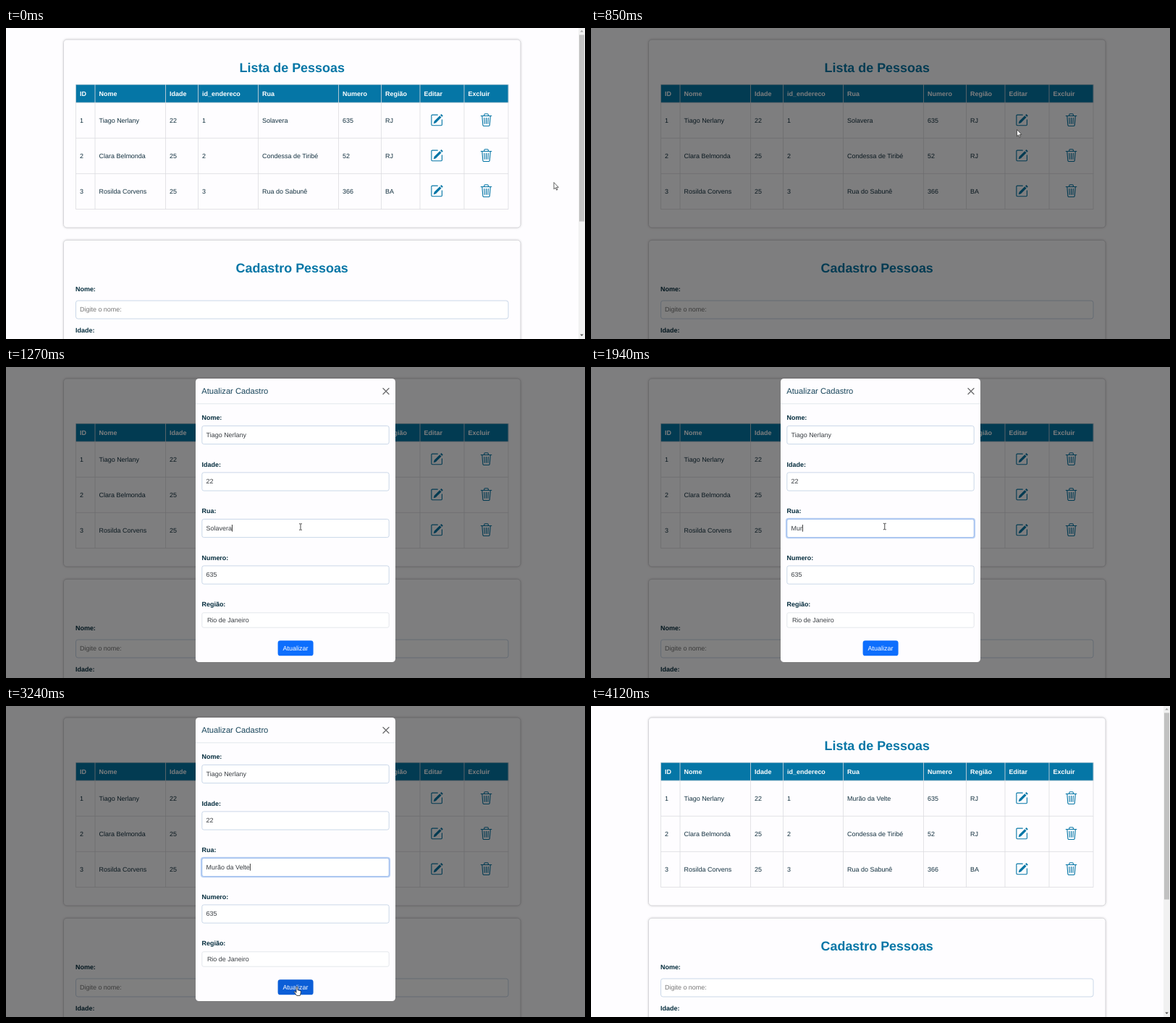
Write an HTML page that moves like this. It is 800 px wide and 430 px high and loops after 4820 ms.

```html
<!DOCTYPE html>
<html lang="pt-BR">
<head>
<meta charset="utf-8">
<title>Lista de Pessoas</title>
<style>
  html, body { margin: 0; width: 100%; height: 100%; overflow: hidden; background: #fefdff; }
  svg { display: block; width: 800px; height: 430px; }
  text { font: 8.96px "Liberation Sans", Arial, sans-serif; fill: #12303f; text-rendering: geometricPrecision; white-space: pre; }
  .bold { font-weight: bold; fill: #032b3c; }
  .head { font-weight: bold; fill: #fff; }
  .title { font-size: 17.92px; font-weight: bold; fill: #0576a6; text-anchor: middle; }
  .hint { fill: #757575; }
  .value { fill: #383d42; }
  .modal-title { font-size: 11.2px; fill: #17445a; }
  .action { fill: #fff; text-anchor: middle; }
  .card { fill: #fefdff; stroke: #d6d6da; filter: drop-shadow(0 0 1.6px rgba(0, 0, 0, .16)); }
  .field { fill: #fff; stroke: #bdcfe2; stroke-width: .8; }
  .select { fill: #fff; stroke: #dee2e6; stroke-width: .8; }
  .grid { fill: none; stroke: #dcdce0; stroke-width: .8; }
  .icon { fill: none; stroke: #0576a6; stroke-width: 1; stroke-linecap: round; stroke-linejoin: round; }
  .icon .solid { fill: #0576a6; stroke: none; }
</style>
</head>
<body>
<svg id="stage" viewBox="0 0 800 430">
  <defs>
    <g id="pencil" class="icon">
      <path d="M9 1.5H2.5a1 1 0 0 0-1 1v11a1 1 0 0 0 1 1h11a1 1 0 0 0 1-1v-6"/>
      <path class="solid" d="M4 12.2l.9-3 6.8-6.8 2 2-6.8 6.9zM12.4 1.7l1.3-1.2 2 2-1.2 1.2z"/>
    </g>
    <g id="trash" class="icon">
      <path d="M1.5 3h13M5.5 2.7V1.5a1 1 0 0 1 1-1h3a1 1 0 0 1 1 1v1.2"/>
      <path d="M2.9 3l.9 11a1.5 1.5 0 0 0 1.5 1.5h5.4a1.5 1.5 0 0 0 1.5-1.5l.9-11M5.6 5.5l.3 7M8 5.5v7M10.4 5.5l-.3 7"/>
    </g>
  </defs>
  <rect width="800" height="430" fill="#fefdff"/>
  <g id="page"></g>
  <g id="scrollbar">
    <rect x="791" width="9" height="430" fill="#f1f1f1"/>
    <rect x="792" y="9.5" width="7" height="258" fill="#c1c1c1"/>
    <path d="M793.2 5.5l2.3-2.4 2.3 2.4z" fill="#a3a3a3"/>
    <path d="M793.2 423.5l2.3 2.4 2.3-2.4z" fill="#505050"/>
  </g>
  <rect id="backdrop" width="800" height="430"/>
  <g id="modal"></g>
  <g id="cursor">
    <path id="arrow" d="M0 0v9.3l2.1-2 1.5 3.3 1.4-.6-1.5-3.2h2.9z" fill="#fff" stroke="#222" stroke-width=".7"/>
    <path id="hand" d="M-1 1a1 1 0 0 1 2 0v3.7l3.2.7q1.4.4 1.2 2l-.5 2.8-.7 2.3h-4.5l-2-3-1.5-2q.3-1.4 1.4-.6l1.4 1.4z" fill="#fff" stroke="#222" stroke-width=".8" stroke-linejoin="round"/>
    <path id="beam" d="M-2-4.2h1.4l.6.5.6-.5h1.4M0-3.7v7.4M-2 4.2h1.4l.6-.5.6.5h1.4" fill="none" stroke="#333" stroke-width=".9"/>
  </g>
</svg>
<script>
const LOOP = 4820;
const OLD_STREET = "Solavera", NEW_STREET = "Murão da Velte";
const $ = id => document.getElementById(id);

function add(parent, tag, attrs, content = "") {
  const node = document.createElementNS("http://www.w3.org/2000/svg", tag);
  for (const key in attrs) node.setAttribute(key, attrs[key]);
  node.textContent = content;
  return parent.appendChild(node);
}
const write = (parent, x, y, content, cls = "") => add(parent, "text", { x, y, class: cls }, content);
const box = (parent, x, y, width, height, rx, cls) => add(parent, "rect", { x, y, width, height, rx, class: cls });

function buildPage() {
  const page = $("page");
  const columns = [96.5, 123, 220.5, 265.5, 348.5, 459.5, 518.5, 572, 633, 694];
  const heads = ["ID", "Nome", "Idade", "id_endereco", "Rua", "Numero", "Região", "Editar", "Excluir"];
  const rows = [
    ["1", "Tiago Nerlany", "22", "1", OLD_STREET, "635", "RJ"],
    ["2", "Clara Belmonda", "25", "2", "Condessa de Tiribé", "52", "RJ"],
    ["3", "Rosilda Corvens", "25", "3", "Rua do Sabunê", "366", "BA"]
  ];
  let street;

  box(page, 79.5, 16, 631.5, 260, 4.5, "card");
  box(page, 79.5, 293.3, 631.5, 260, 4.5, "card");
  write(page, 395.2, 61.2, "Lista de Pessoas", "title");
  write(page, 395.2, 338.2, "Cadastro Pessoas", "title");

  add(page, "rect", { x: 96, y: 78, width: 598.2, height: 25.2, fill: "#0576a6" });
  let lines = columns.map(x => `M${x} 78V250.6`).join("");
  for (let i = 0; i < 4; i++) lines += `M96.5 ${103.2 + i * 49.1}H694`;
  add(page, "path", { d: lines + "M96.5 78.2H694", class: "grid" });

  heads.forEach((head, i) => write(page, columns[i] + 5.6, 93.6, head, "head"));
  rows.forEach((row, r) => {
    const top = r * 49;
    row.forEach((cell, i) => {
      const node = write(page, columns[i] + 5.6, 130.8 + top, cell);
      if (cell === OLD_STREET) street = node;
    });
    add(page, "use", { href: "#pencil", transform: `translate(586.2 ${118.5 + top}) scale(1.12)` });
    add(page, "use", { href: "#trash", transform: `translate(654.6 ${118.2 + top}) scale(1.12)` });
  });

  write(page, 96, 363.8, "Nome:", "bold");
  box(page, 96.5, 377, 597.5, 25, 3, "field");
  write(page, 102, 392.2, "Digite o nome:", "hint");
  write(page, 96, 420.6, "Idade:", "bold");
  return { street };
}

function buildModal() {
  const modal = $("modal");
  const values = [["Nome:", "Tiago Nerlany"], ["Idade:", "22"], ["Rua:", OLD_STREET], ["Numero:", "635"]];
  const parts = {};

  box(modal, 262, 16, 276, 392, 4.5, "").setAttribute("fill", "#fefdff");
  write(modal, 270.3, 37.4, "Atualizar Cadastro", "modal-title");
  add(modal, "path", { d: "M521 29.5l8 8m0-8l-8 8", stroke: "#6c6c6e", "stroke-width": 1.3, "stroke-linecap": "round" });
  add(modal, "path", { d: "M262 50.8H538", stroke: "#dee2e6", "stroke-width": .8 });

  values.forEach(([label, value], i) => {
    const top = i * 64.5;
    write(modal, 270.5, 73.4 + top, label, "bold");
    if (label === "Rua:")
      parts.ring = add(modal, "rect", { x: 270, y: 80.8 + top, width: 260, height: 26.4, rx: 3, fill: "none", stroke: "#b9d0f4", "stroke-width": 2.2 });
    const field = box(modal, 270.8, 81.4 + top, 258.4, 25.2, 2.6, "field");
    const text = write(modal, 276.6, 96.8 + top, value, "value");
    if (label === "Rua:") Object.assign(parts, { field, text });
  });
  write(modal, 270.5, 331.4, "Região:", "bold");
  box(modal, 270.8, 339.8, 258.4, 20.4, 2.2, "select");
  write(modal, 277.9, 352.9, "Rio de Janeiro", "value");
  parts.button = box(modal, 375.6, 378.3, 49, 21, 3.4, "");
  write(modal, 400, 391.6, "Atualizar", "action");
  parts.caret = add(modal, "rect", { y: 218, width: .8, height: 9.6, fill: "#111" });
  return parts;
}

const { street } = buildPage();
const { ring, field, text, button, caret } = buildModal();

const ramp = (t, from, to) => Math.min(1, Math.max(0, (t - from) / (to - from)));
const smooth = p => p * p * (3 - 2 * p);

// time, x, y, shape until the next stop
const path = [
  [0, 757, 213.5, "arrow"], [50, 757, 213.5, "arrow"], [590, 592, 146, "hand"],
  [690, 588.5, 140.5, "hand"], [820, 588.5, 140.5, "arrow"], [940, 588.5, 140.5, "arrow"],
  [1160, 412, 223, "beam"], [1260, 407, 221, "beam"], [2660, 404.5, 220, "beam"],
  [2800, 404.5, 220, "beam"], [2890, 403, 245, "arrow"], [3150, 402, 388, "hand"],
  [3310, 402, 388, "arrow"], [3410, 414.5, 396, "beam"], [3640, 414.5, 396, "beam"],
  [3760, 415, 404, "arrow"], [4040, 418, 440, "arrow"]
];

function moveCursor(t) {
  const i = path.findLastIndex(stop => stop[0] <= t);
  const [t0, x0, y0, shape] = path[i];
  const [t1, x1, y1] = path[i + 1] || [LOOP, x0, y0];
  const p = smooth(ramp(t, t0, t1));
  $("cursor").setAttribute("transform", `translate(${x0 + (x1 - x0) * p} ${y0 + (y1 - y0) * p})`);
  for (const id of ["arrow", "hand", "beam"]) $(id).style.display = id === shape ? "" : "none";
}

function streetAt(t) {
  if (t < 1720) return OLD_STREET.slice(0, Math.ceil(OLD_STREET.length * (1 - ramp(t, 1320, 1680))));
  return NEW_STREET.slice(0, Math.floor(NEW_STREET.length * ramp(t, 1720, 2600)));
}

function render(t) {
  const open = t >= 815 && t < 3400;
  const shown = smooth(ramp(t, 852, 960)) * (1 - ramp(t, 3300, 3365));
  const focus = ramp(t, 1275, 1330) * (1 - ramp(t, 3270, 3300));

  $("scrollbar").style.display = open ? "none" : "";
  $("backdrop").setAttribute("opacity", .5 * ramp(t, 812, 848) * (1 - ramp(t, 3350, 3400)));
  $("modal").setAttribute("opacity", shown);
  $("modal").setAttribute("transform", `translate(0 ${-28 * (1 - shown)})`);

  street.textContent = t < 3340 ? OLD_STREET : NEW_STREET;
  text.textContent = streetAt(t);
  caret.setAttribute("x", 276.7 + text.getComputedTextLength());
  caret.style.display = t >= 1230 && t < 3280 ? "" : "none";
  ring.setAttribute("opacity", focus);
  field.style.stroke = focus > .5 ? "#8fb4ea" : "";
  button.setAttribute("fill", t >= 3130 && t < 3400 ? "#0b5ed7" : "#0d6efd");
  moveCursor(t);
}

const start = performance.now();
function tick() {
  render((performance.now() - start) % LOOP);
  requestAnimationFrame(tick);
}
tick();
</script>
</body>
</html>
```
